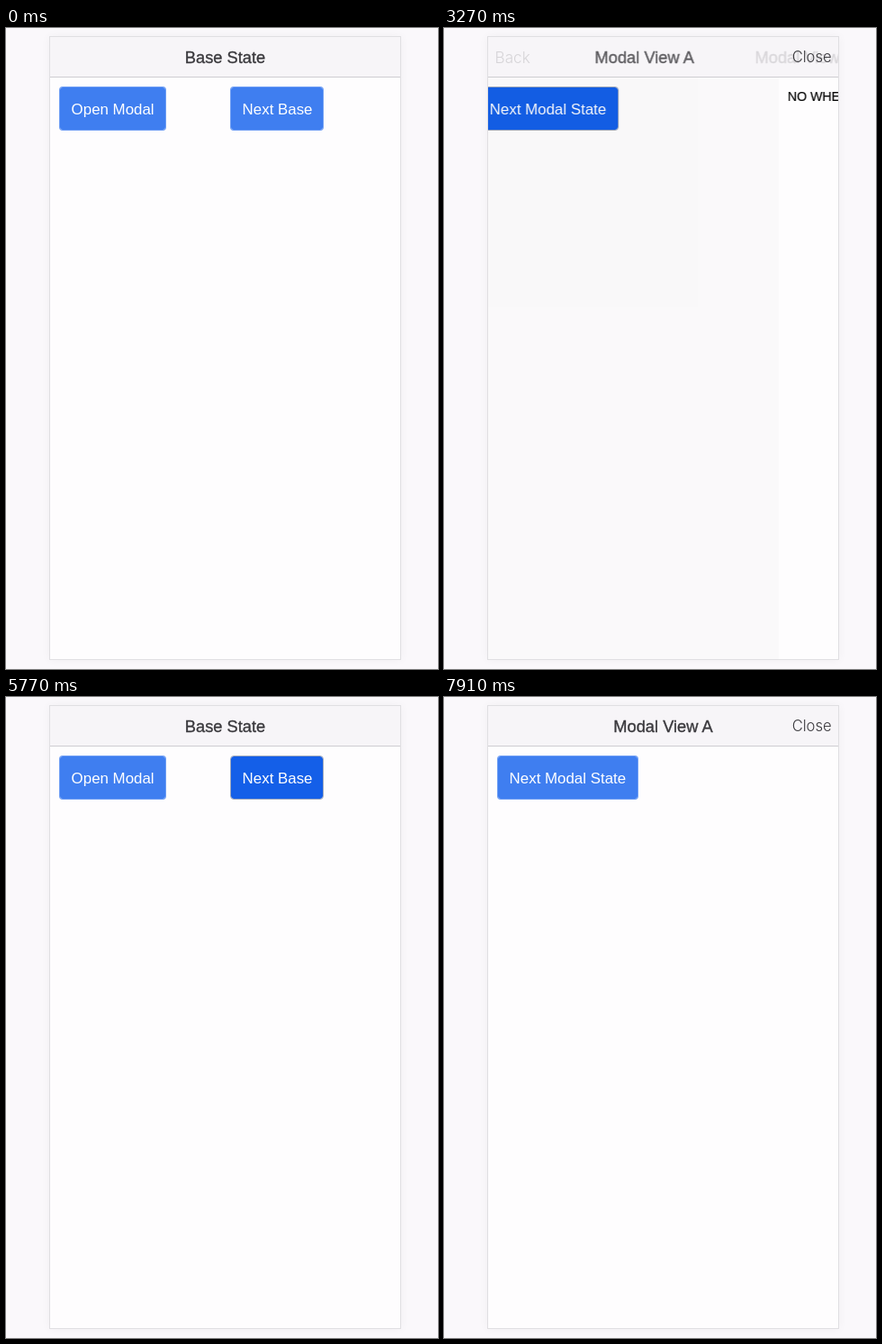
These frames come from a looping animation (480 by 712 pixels, 8 s). An HTML page:

```html
<!DOCTYPE html>
<html lang="en">
<head>
<meta charset="utf-8">
<title>Modal navigation</title>
<style>
  html, body { margin: 0; width: 100%; height: 100%; overflow: hidden; background: #faf8fb; }
  body { position: relative; font-family: "Liberation Sans", Arial, sans-serif; white-space: nowrap; }
  .panel, .screen, .views, .view, .bar, .bar > *, .btn, .note { position: absolute; box-sizing: border-box; }
  .panel {
    left: 48px; top: 9px; width: 391px; height: 693px; overflow: hidden;
    border: 1px solid #e0dfe2; background: #fefdfe; box-shadow: 0 0 10px rgba(0, 0, 0, .045);
  }
  .screen { inset: 0; overflow: hidden; }
  .views { inset: 45px 0 0; background: #000; overflow: hidden; }
  .view { inset: 0; background: #fefdfe; }
  .bar {
    left: 0; right: 0; top: 0; height: 45px; overflow: hidden; line-height: 46px;
    background: #f7f5f8; border-bottom: 1px solid #cecdd1; color: #3a393d;
  }
  .title { left: 0; width: 100%; text-align: center; font-size: 18.3px; -webkit-text-stroke: .35px; }
  .soft { color: #48474b; }
  .light { font: 300 16.6px/45px Inter, "Liberation Sans", sans-serif; }
  .backText { left: 28px; font-size: 17.6px; }
  .chevron { left: 7px; top: 11px; width: 16px; height: 23px; fill: none; stroke: #3a393d; stroke-width: 3.6; }
  .btn {
    top: 10px; height: 49px; padding-left: 12.6px; line-height: 50px; border-radius: 4px;
    font-size: 16.9px; color: #fff; background: #3f7ef0 padding-box; border: 1px solid rgba(63, 126, 240, .75);
  }
  .note { left: 10px; top: 12px; font-size: 14.2px; line-height: 18px; color: #000; -webkit-text-stroke: .15px; }
</style>
</head>
<body>
<div class="panel">
  <div class="screen">
    <div class="views">
      <div class="view" id="baseOne">
        <div class="btn" id="openOne" style="left:10px;width:119px">Open Modal</div>
        <div class="btn" id="nextBase" style="left:200px;width:104px">Next Base</div>
      </div>
      <div class="view" id="baseTwo">
        <div class="btn" id="openTwo" style="left:10px;width:119px">Open Modal</div>
      </div>
    </div>
    <div class="bar">
      <div class="title" id="titleOne">Base State</div>
      <div class="title" id="titleTwo">Next Base State</div>
      <svg class="chevron" id="chevron" viewBox="0 0 16 23"><path d="M13 2 3.5 11.5 13 21"/></svg>
      <div class="backText" id="backText">Base State</div>
    </div>
  </div>
  <div class="screen" id="modal">
    <div class="views">
      <div class="view" id="viewA">
        <div class="btn" id="nextModal" style="left:10px;width:157px">Next Modal State</div>
      </div>
      <div class="view" id="viewB"><div class="note">NO WHERE LEFT TO GO</div></div>
    </div>
    <div class="bar">
      <div class="title" id="titleA">Modal View A</div>
      <div class="title soft" id="titleB">Modal View B</div>
      <div class="light" id="back" style="left:7.5px;font-size:17.2px">Back</div>
      <div class="light" id="close" style="right:7.4px">Close</div>
    </div>
  </div>
</div>
<script>
const LOOP = 8000;
const NAV = 'cubic-bezier(.36,.66,.04,1)';
const RISE = 'cubic-bezier(.1,.7,.1,1)';
const el = id => document.getElementById(id);

// Each step is [time, style, easing towards the next step].
function play(id, steps) {
  const last = steps[steps.length - 1];
  const frames = [[0, steps[0][1]], ...steps, [LOOP, last[1]]];
  el(id).animate(
    frames.map(([time, style, easing = 'linear']) => ({ ...style, offset: time / LOOP, easing })),
    { duration: LOOP, iterations: Infinity });
}

// Move between two styles; an optional reset time jumps back to the first.
function shift(id, start, from, to, reset) {
  const steps = [[start, from, NAV], [start + 500, to]];
  if (reset) steps.push([reset, to, 'step-end'], [reset + 1, from]);
  play(id, steps);
}

function hold(id, start, end, normal, active) {
  play(id, [[start - 1, normal, 'step-end'], [start, active, 'step-end'], [end, normal]]);
}

function press(id, start, end) {
  hold(id, start, end,
    { backgroundColor: '#3f7ef0', borderColor: 'rgba(63, 126, 240, .75)' },
    { backgroundColor: '#145fe8', borderColor: '#9fa9bd' });
}

const slide = (x, opacity = 1) => ({ transform: `translateX(${x})`, opacity });
const lift = y => ({ transform: `translateY(${y})` });

function push(start, leaving, entering, oldTitle, newTitle, reset) {
  shift(leaving, start, slide('0%'), slide('-33%', .9), reset);
  shift(entering, start, slide('100%'), slide('0%'), reset);
  shift(oldTitle, start, slide('0px'), slide('-122px', 0), reset);
  shift(newTitle, start, slide('190px', 0), slide('0px'), reset);
}

press('openOne', 1360, 1730);
press('nextModal', 3140, 3400);
press('nextBase', 5550, 6000);
press('openTwo', 7050, 7460);
hold('close', 4450, 4740, { opacity: 1 }, { opacity: .3 });

play('modal', [
  [1730, lift('100%'), RISE], [2130, lift('0%')],
  [4740, lift('0%'), 'ease-in-out'], [4990, lift('100%')],
  [7460, lift('100%'), RISE], [7860, lift('0%')]
]);

push(3230, 'viewA', 'viewB', 'titleA', 'titleB', 5100);
shift('back', 3230, { opacity: 0 }, { opacity: 1 }, 5100);

push(5815, 'baseOne', 'baseTwo', 'titleOne', 'titleTwo');
shift('chevron', 5815, { opacity: 0 }, { opacity: 1 });
shift('backText', 5815, slide('122px', 0), slide('0px'));
</script>
</body>
</html>
```
